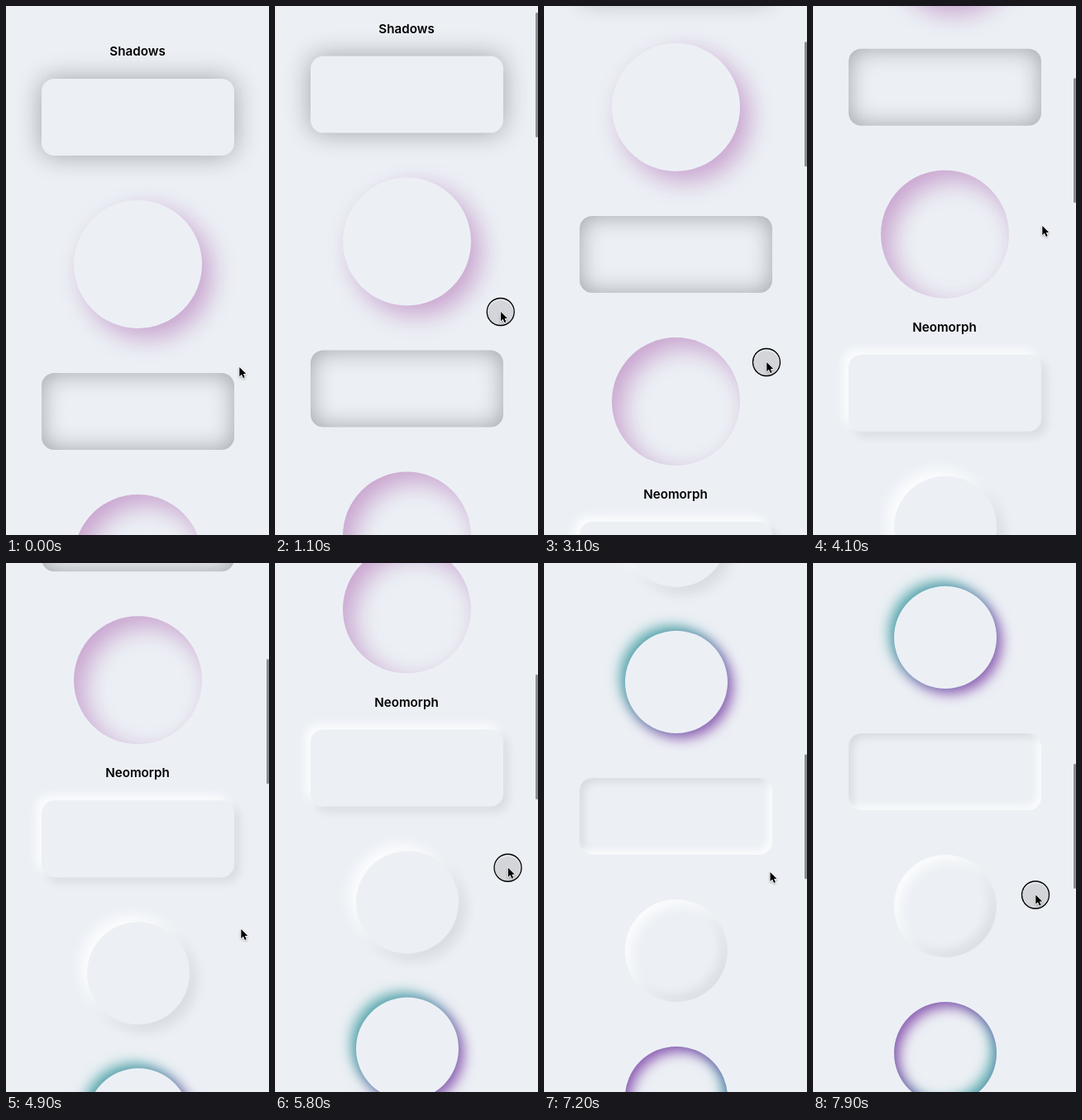
Write an HTML page that moves like this. It is 318x640 px and loops after 8 s.

```html
<!DOCTYPE html>
<html lang="en">
<head>
<meta charset="utf-8">
<title>Shadows</title>
<style>
  html, body { margin: 0; width: 100%; height: 100%; overflow: hidden; background: #ecf0f5; }
  #stage { position: relative; width: 318px; height: 640px; overflow: hidden; background: #ecf0f5; }
  #page { position: absolute; left: 0; top: 0; width: 318px; height: 1800px; }
  #page > * { position: absolute; box-sizing: border-box; background: #ecf0f5; }
  h2 {
    left: 0; width: 318px; height: 20px; margin: 0; text-align: center; color: #000;
    font: 600 15.2px/20px Inter, "Liberation Sans", sans-serif;
  }
  .box { left: 43.2px; width: 232.5px; height: 93px; border-radius: 15.5px; }
  .big { left: 82px; width: 155px; height: 155px; border-radius: 50%; }
  .small { left: 97.5px; width: 124px; height: 124px; border-radius: 50%; }

  .soft { box-shadow: 0 0 31px rgba(0,0,0,.33); }
  .soft-in { box-shadow: inset 0 0 29px rgba(0,0,0,.33); }
  .violet { box-shadow: 11.6px 11.6px 31px rgba(128,0,128,.33); }
  .violet-in { box-shadow: inset 11.6px 11.6px 31px rgba(128,0,128,.33); }
  .raised { box-shadow: -6px -6px 12px rgba(255,255,255,.85), 6px 6px 12px rgba(0,0,0,.085); }
  .raised.small { box-shadow: -7.75px -7.75px 15.5px rgba(255,255,255,.85), 7.75px 7.75px 15.5px rgba(0,0,0,.09); }
  .glow { box-shadow: -6px -6px 15.5px rgba(0,130,132,.62), 6px 6px 15.5px rgba(102,20,148,.66); }
  .sunk { box-shadow: inset -5px -5px 9px rgba(255,255,255,.75), inset 5px 5px 10px rgba(0,0,0,.085); }
  .dome { box-shadow: inset 7px 7px 14px rgba(255,255,255,.8), inset -7px -7px 14px rgba(0,0,0,.075); }
  .glow-in { box-shadow: inset 6px 6px 15.5px rgba(102,20,148,.66), inset -6px -6px 15.5px rgba(0,130,132,.62); }

  #bar { position: absolute; left: 315.4px; top: 0; width: 2.6px; height: 150.5px; border-radius: 1.3px; background: #8b8e91; }
  #pointer { position: absolute; left: 0; top: 0; overflow: visible; }
</style>
</head>
<body>
<div id="stage">
  <div id="page">
    <h2 style="top:44.5px">Shadows</h2>
    <div class="box soft" style="top:88px"></div>
    <div class="big violet" style="top:235px"></div>
    <div class="box soft-in" style="top:444px"></div>
    <div class="big violet-in" style="top:591px"></div>
    <h2 style="top:770.5px">Neomorph</h2>
    <div class="box raised" style="top:814px"></div>
    <div class="small raised" style="top:961px"></div>
    <div class="small glow" style="top:1138px"></div>
    <div class="box sunk" style="top:1316px"></div>
    <div class="small dome" style="top:1463px"></div>
    <div class="small glow-in" style="top:1641px"></div>
  </div>
  <div id="bar"></div>
  <svg id="pointer" width="1" height="1">
    <g id="touch">
      <circle cx="0" cy="2" r="15.6" fill="#bfc0c4" fill-opacity=".6"/>
      <circle r="16.5" fill="#d6d8dc" fill-opacity=".45" stroke="#000" stroke-width="1.3"/>
    </g>
    <path d="M.3 0V11.2L2.9 8.8L4.8 13.1L6.7 12.3L4.9 8.1H8.3Z" fill="#000" stroke="#fff"
      stroke-width="1.6" paint-order="stroke" stroke-linejoin="round"
      style="filter:drop-shadow(0 1px 1px rgba(0,0,0,.3))"/>
  </svg>
</div>
<script>
const LOOP = 8000, STEP = 100, TAU = 0.5;
const $ = id => document.getElementById(id);
const page = $('page'), bar = $('bar'), pointer = $('pointer'), touch = $('touch');

// Keys: [seconds, value, easing into the key]; a number is a power, 'coast' is a fling, 'ease' is smooth.
const scrollKeys = [
  [0.6, 0], [0.7, 9, 1], [1.5, 46, 1], [1.9, 79, 1.2], [2.25, 165, 1],
  [3.0, 188, 'coast'], [3.1, 190, 1], [4.0, 355, 2.3], [5.2, 542, 'coast'],
  [6.0, 709, 3], [7.7, 1078, 'coast'], [7.9, 1110, 1.4]
];
const xKeys = [
  [0, 282], [0.1, 217, 1], [0.2, 256, 1], [0.3, 273, 1], [1.9, 272.5, 1], [2.9, 269, 'ease'],
  [3.1, 269, 1], [4.0, 277, 1], [4.1, 277, 1], [4.9, 284, 'ease'], [6.0, 281, 1],
  [6.6, 281, 1], [7.6, 269, 'ease']
];
const yKeys = [
  [0, 437], [0.1, 368, 1], [0.2, 396, 1], [0.3, 404, 1], [0.6, 404, 1], [0.7, 390, 1],
  [1.5, 350, 1], [1.9, 316, 1.2], [2.25, 230, 1], [2.9, 440, 'ease'], [3.0, 440, 1],
  [3.1, 431, 1], [4.0, 266, 2.3], [4.1, 266, 1], [4.9, 443, 'ease'], [5.2, 443, 1],
  [6.0, 267, 3], [6.6, 267, 1], [7.6, 432, 'ease'], [7.7, 432, 1], [7.9, 401.5, 1.4]
];
const presses = [[0.5, 2.3], [3.0, 4.0], [5.1, 6.0], [7.7, 8]];

function ease(kind, p, span) {
  if (kind === 'coast') return (1 - Math.exp(-p * span / TAU)) / (1 - Math.exp(-span / TAU));
  if (kind === 'ease') return p * p * (3 - 2 * p);
  return p ** kind;
}

function sample(keys, t) {
  if (t <= keys[0][0]) return keys[0][1];
  for (let i = 1; i < keys.length; i++) {
    const [t0, a] = keys[i - 1], [t1, b, kind] = keys[i];
    if (t < t1) return a + (b - a) * ease(kind, (t - t0) / (t1 - t0), t1 - t0);
  }
  return keys[keys.length - 1][1];
}

function draw(ms) {
  const t = Math.floor((ms % LOOP) / STEP) * STEP / 1000;
  const scroll = sample(scrollKeys, t);
  page.style.transform = `translateY(${-scroll}px)`;
  bar.style.transform = `translateY(${1.9 + scroll * 0.2173}px)`;
  bar.style.opacity = scroll > 0 ? 1 : 0;
  pointer.style.transform = `translate(${sample(xKeys, t)}px, ${sample(yKeys, t)}px)`;
  touch.style.display = presses.some(([a, b]) => t >= a && t < b) ? '' : 'none';
}

const start = performance.now();
function tick() {
  draw(performance.now() - start);
  requestAnimationFrame(tick);
}
draw(0);
requestAnimationFrame(tick);
</script>
</body>
</html>
```
